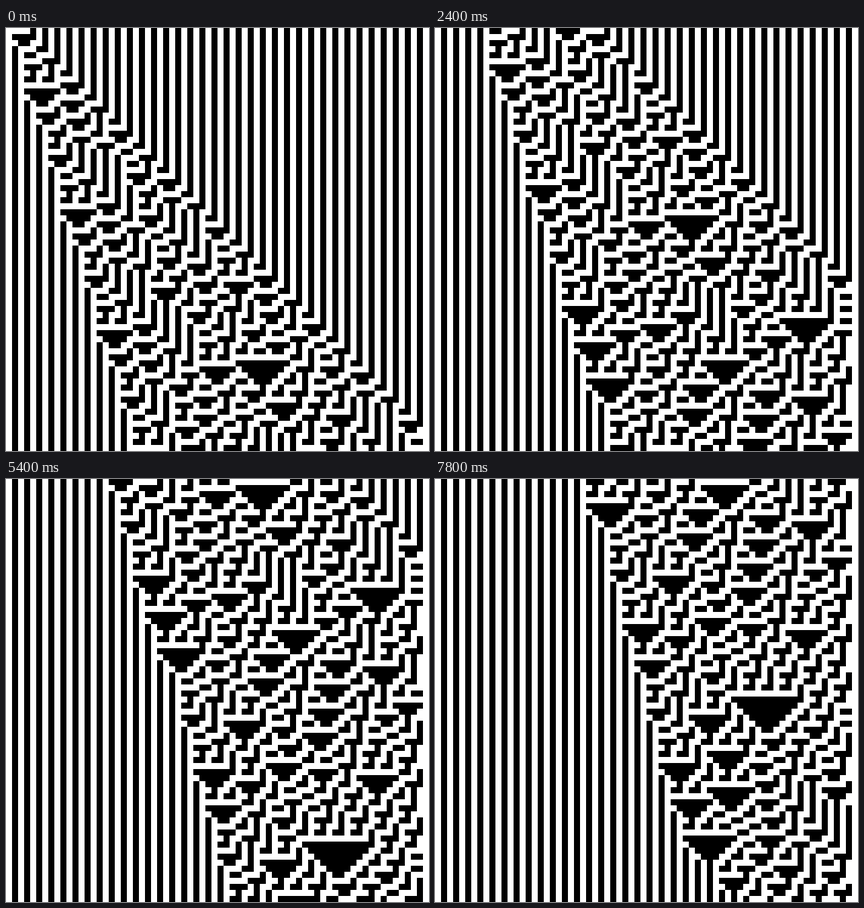
An HTML page with a canvas for the animation above (8000 ms loop, 700 by 700 pixels).

```html
<!DOCTYPE html>
<html lang="en">
<head>
<meta charset="utf-8">
<title>Rule 30</title>
<style>
  html, body { margin: 0; width: 100%; height: 100%; overflow: hidden; background: #fff; }
  canvas { display: block; width: 700px; height: 700px; }
</style>
</head>
<body>
<canvas width="700" height="700"></canvas>
<script>
const SIZE = 70, CELL = 10;
const LOOP = 8000, STEP = 200, ROWS_PER_STEP = 2;
const ctx = document.querySelector('canvas').getContext('2d');

// Rule 30 with both edge cells held at 1; 1 is white, 0 is black.
const nextRow = row => row.map((cell, i) =>
  i === 0 || i === SIZE - 1 ? 1 : row[i - 1] ^ (cell | row[i + 1]));

// Alternating cells, disturbed only by a block of ones at the left edge.
const rows = [Array.from({ length: SIZE }, (_, i) => i < 4 ? 1 : i % 2)];
const rowCount = SIZE + ROWS_PER_STEP * LOOP / STEP;
while (rows.length < rowCount) rows.push(nextRow(rows[rows.length - 1]));

function draw(top) {
  ctx.fillStyle = '#fff';
  ctx.fillRect(0, 0, SIZE * CELL, SIZE * CELL);
  ctx.fillStyle = '#000';
  for (let y = 0; y < SIZE; y++) {
    rows[top + y].forEach((cell, x) => {
      if (!cell) ctx.fillRect(x * CELL, y * CELL, CELL, CELL);
    });
  }
}

let shownTop = -1;
function tick() {
  const top = ROWS_PER_STEP * Math.floor(performance.now() % LOOP / STEP);
  if (top !== shownTop) draw(shownTop = top);
  requestAnimationFrame(tick);
}
tick();
</script>
</body>
</html>
```
